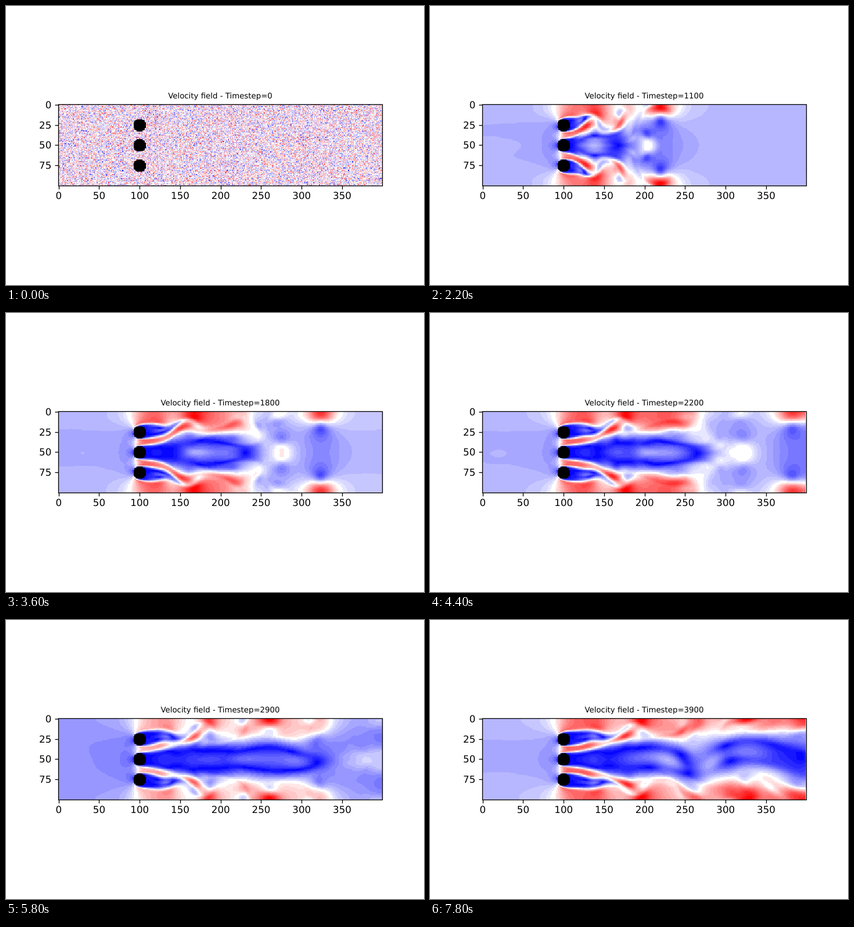
Write an HTML page with a canvas that moves like this. It is 720 px wide and 480 px high and loops after 8 s.

```html
<!DOCTYPE html>
<html lang="en">
<head>
<meta charset="utf-8">
<title>Velocity field</title>
<style>
  html, body { margin: 0; width: 100%; height: 100%; overflow: hidden; background: #fff; }
  canvas, svg { position: absolute; left: 0; top: 0; }
  text { font: 16.67px "DejaVu Sans", sans-serif; text-rendering: geometricPrecision; }
  #title { font-size: 13.33px; }
</style>
</head>
<body>
<canvas id="field" width="720" height="480"></canvas>
<svg id="axes" width="720" height="480" viewBox="0 0 720 480"></svg>
<script>
// Lattice Boltzmann flow (D2Q9) past three cylinders, drawn as speed.
const W = 400, H = 100, CELLS = W * H;
const TAU = 0.53, RADIUS = 8;
const FRAME_MS = 200, FRAMES = 40, STEPS_PER_FRAME = 100;
const LEFT = 90, TOP = 170, IMG_W = 558, IMG_H = 139, SCALE = IMG_W / W;

// ---- Initial state ----
let seed = 42;
function random() {
  seed = (seed + 0x6D2B79F5) | 0;
  let t = Math.imul(seed ^ (seed >>> 15), 1 | seed);
  t = (t + Math.imul(t ^ (t >>> 7), 61 | t)) ^ t;
  return ((t ^ (t >>> 14)) >>> 0) / 4294967296;
}
const gaussian = () =>
  Math.sqrt(-2 * Math.log(1 - random())) * Math.cos(2 * Math.PI * random());

// Directions (x right, y up): 0 rest, then (0,1) (1,1) (1,0) (1,-1) (0,-1) (-1,-1) (-1,0) (-1,1)
const makeState = () => Array.from({ length: 9 }, () => new Float64Array(CELLS));
let current = makeState(), next = makeState();
current.forEach((f, k) => {
  // Filled from the bottom up; row 0 is on the mirror line of the periodic domain.
  for (let n = 0; n < H; n++) {
    const row = ((H - n) % H) * W;
    for (let x = 0; x < W; x++) f[row + x] = k === 3 ? 2.3 : 1 + 0.01 * gaussian();
  }
});

const solid = new Uint8Array(CELLS);
for (let i = 0; i < CELLS; i++) {
  const x = i % W, y = (i - x) / W;
  solid[i] = [25, 50, 75].some(cy => Math.hypot(x - 100, y - cy) < RADIUS) ? 1 : 0;
}

// ---- Simulation ----
function openEnds(f) {
  for (let row = 0; row < CELLS; row += W) {
    for (let k = 6; k < 9; k++) f[k][row + W - 1] = f[k][row + W - 2];
    for (let k = 2; k < 5; k++) f[k][row] = f[k][row + 1];
  }
}

function streamAndCollide(src, dst) {
  const [a0, a1, a2, a3, a4, a5, a6, a7, a8] = src;
  const [b0, b1, b2, b3, b4, b5, b6, b7, b8] = dst;
  const omega = 1 / TAU, keep = 1 - omega;
  for (let y = 0; y < H; y++) {
    const row = y * W, above = ((y + H - 1) % H) * W, below = ((y + 1) % H) * W;
    for (let x = 0; x < W; x++) {
      const l = x > 0 ? x - 1 : W - 1, r = x < W - 1 ? x + 1 : 0, i = row + x;
      const f0 = a0[i];
      let f1 = a1[below + x], f2 = a2[below + l], f3 = a3[row + l], f4 = a4[above + l];
      let f5 = a5[above + x], f6 = a6[above + r], f7 = a7[row + r], f8 = a8[below + r];
      const rho = f0 + f1 + f2 + f3 + f4 + f5 + f6 + f7 + f8;
      let ux = 0, uy = 0;
      if (solid[i]) {
        let t = f1; f1 = f5; f5 = t;
        t = f2; f2 = f6; f6 = t;
        t = f3; f3 = f7; f7 = t;
        t = f4; f4 = f8; f8 = t;
      } else {
        const inv = 1 / rho;
        ux = (f2 + f3 + f4 - f6 - f7 - f8) * inv;
        uy = (f1 + f2 + f8 - f4 - f5 - f6) * inv;
      }
      const diag = rho * omega / 36, axis = 4 * diag;
      const base = 1 - 1.5 * (ux * ux + uy * uy);
      const p = ux + uy, m = ux - uy;
      const ex = base + 4.5 * ux * ux, ey = base + 4.5 * uy * uy;
      const ep = base + 4.5 * p * p, em = base + 4.5 * m * m;
      b0[i] = keep * f0 + 4 * axis * base;
      b1[i] = keep * f1 + axis * (ey + 3 * uy);
      b5[i] = keep * f5 + axis * (ey - 3 * uy);
      b3[i] = keep * f3 + axis * (ex + 3 * ux);
      b7[i] = keep * f7 + axis * (ex - 3 * ux);
      b2[i] = keep * f2 + diag * (ep + 3 * p);
      b6[i] = keep * f6 + diag * (ep - 3 * p);
      b4[i] = keep * f4 + diag * (em + 3 * m);
      b8[i] = keep * f8 + diag * (em - 3 * m);
    }
  }
}

// ---- Rendering ----
const ctx = document.getElementById('field').getContext('2d');

function measureSpeed(f) {
  const speed = new Float64Array(CELLS);
  let min = Infinity, max = 0;
  for (let i = 0; i < CELLS; i++) {
    if (solid[i]) continue;
    let rho = 0;
    for (let k = 0; k < 9; k++) rho += f[k][i];
    const ux = f[2][i] + f[3][i] + f[4][i] - f[6][i] - f[7][i] - f[8][i];
    const uy = f[1][i] + f[2][i] + f[8][i] - f[4][i] - f[5][i] - f[6][i];
    const v = speed[i] = Math.hypot(ux, uy) / rho;
    if (v < min) min = v;
    if (v > max) max = v;
  }
  return { speed, min, max };
}

// Cell shown by each pixel along one side.
const cellsFor = (pixels, cells, offset) => Array.from({ length: pixels },
  (_, p) => Math.min(cells - 1, Math.floor((p + offset) / SCALE)));
const columns = cellsFor(IMG_W, W, 0.5), rows = cellsFor(IMG_H, H, 1);

function renderField() {
  const { speed, min, max } = measureSpeed(current);
  const image = ctx.createImageData(IMG_W, IMG_H), px = image.data;
  let o = 0;
  for (const row of rows) {
    for (const column of columns) {
      const i = row * W + column;
      px[o + 3] = 255;
      if (!solid[i]) {
        const t = (speed[i] - min) / (max - min);
        const raw = Math.floor(510 * Math.min(t, 1 - t));
        const shade = raw >= 240 ? 255 : (raw & 240) | 7;
        px[o] = t < 0.5 ? shade : 255;
        px[o + 1] = shade;
        px[o + 2] = t < 0.5 ? 255 : shade;
      }
      o += 4;
    }
  }
  return image;
}

// ---- Axes ----
const xTicks = [0, 50, 100, 150, 200, 250, 300, 350].map(v => {
  const x = LEFT + (v + 0.5) * SCALE, line = Math.round(x) + 0.5;
  return `<path d="M${line} 309.5v6"/><text x="${x}" y="332" text-anchor="middle">${v}</text>`;
});
const yTicks = [[0, 170.5], [25, 205.5], [50, 239.5], [75, 274.5]].map(([v, y]) =>
  `<path d="M90.5 ${y}h-6"/><text x="78.3" y="${y + 5.5}" text-anchor="end">${v}</text>`);
document.getElementById('axes').innerHTML = `
  <style>path, rect { fill: none; stroke: #000; stroke-width: 1.33 }</style>
  <rect x="90.5" y="169.5" width="558" height="140"/>
  ${xTicks.join('')}${yTicks.join('')}
  <text id="title" x="369" y="159" text-anchor="middle"></text>`;
const title = document.getElementById('title');

// ---- Playback ----
const frames = [];
let iteration = 0;

function advance() {
  openEnds(current);
  streamAndCollide(current, next);
  [current, next] = [next, current];
  if (iteration++ % STEPS_PER_FRAME === 0) frames.push(renderField());
}
function computeUpTo(count) {
  while (frames.length < count) advance();
}
// Works ahead in short slices so that playback never has to wait.
function workAhead() {
  for (let n = 0; n < 20 && frames.length < FRAMES; n++) advance();
  if (frames.length < FRAMES) setTimeout(workAhead, 0);
}

let shown = -1;
function show(index) {
  if (index === shown) return;
  shown = index;
  computeUpTo(index + 1);
  ctx.putImageData(frames[index], LEFT, TOP);
  title.textContent = `Velocity field - Timestep=${index * STEPS_PER_FRAME}`;
}

computeUpTo(12);
const start = performance.now();
function tick() {
  show(Math.floor((performance.now() - start) / FRAME_MS) % FRAMES);
  requestAnimationFrame(tick);
}
tick();
workAhead();
</script>
</body>
</html>
```
